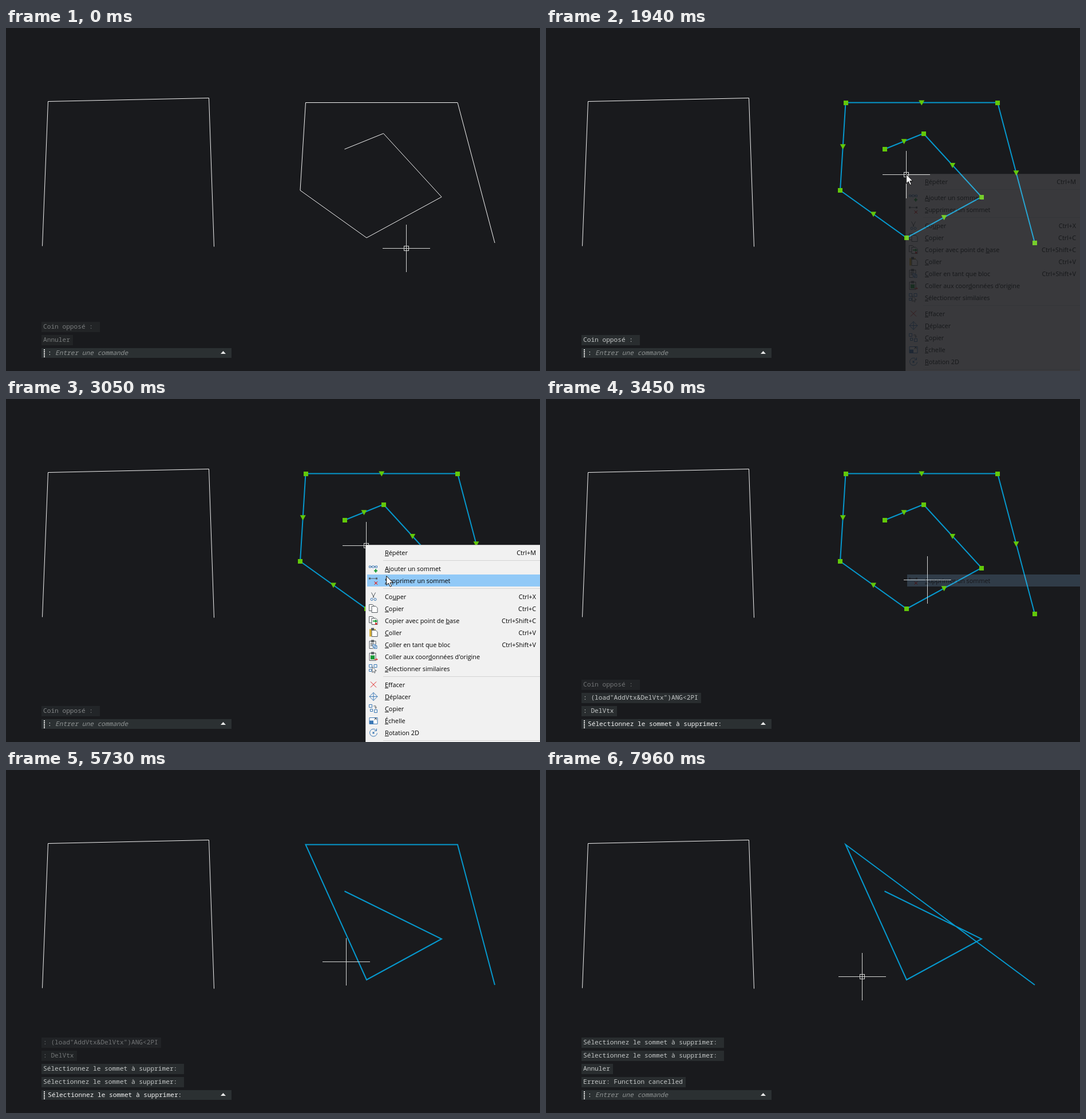
Animation, 933 px wide and 600 px high, one loop 7990 ms. Source, as an HTML page with a canvas:

```html
<!DOCTYPE html>
<html lang="fr">
<head>
<meta charset="utf-8">
<style>
  html, body { margin: 0; width: 100%; height: 100%; overflow: hidden; background: #191a1d; }
  canvas { display: block; }
</style>
</head>
<body>
<canvas id="stage" width="933" height="600"></canvas>
<script>
const LOOP = 7990, BG = '#191a1d';
const MONO = '11.17px "Noto Sans Mono", "DejaVu Sans Mono", monospace';
const SANS = '10.85px "Open Sans", "Noto Sans", sans-serif';
const ctx = document.getElementById('stage').getContext('2d');
const menuLayer = document.createElement('canvas');
menuLayer.width = 933;
menuLayer.height = 600;
const menu = menuLayer.getContext('2d');

const frame = [[63.5, 381.5], [73.5, 128.5], [354.5, 122.5], [363.5, 382.5]];
const shape = [[591.5, 212], [659.5, 184.5], [761, 295.5], [630, 367],
               [514, 284], [523.5, 130.5], [789, 130.5], [854, 376]];
const removals = [[4130, 1], [5310, 4], [6610, 6]]; // time, vertex index

const SELECT = 'Sélectionnez le sommet à supprimer:';
// time shown, time the fade begins, text
const log = [
  [-999, -250, 'Coin opposé : '],
  [-998, -250, 'Annuler'],
  [840, 3050, 'Coin opposé : '],
  [3280, 5320, ': (load"AddVtx&DelVtx")ANG<2PI'],
  [3290, 5350, ': DelVtx'],
  [4130, 6590, SELECT + ' '],
  [5310, 9000, SELECT + ' '],
  [6610, 9000, SELECT + ' '],
  [7100, 9000, 'Annuler'],
  [7110, 9000, 'Erreur: Function cancelled'],
];
const fade = [[0, .6], [400, .5], [1500, .16], [1600, .08], [1900, 0]];

// time, x, y
const crossPath = [
  [0, 699, 385], [420, 699, 385], [900, 600, 290], [1050, 600, 290],
  [1450, 629, 256], [3249, 629, 256], [3250, 666, 316], [3450, 666, 316],
  [3920, 660, 207], [4110, 660, 207], [4640, 618, 301], [4900, 567, 308],
  [5050, 562, 311], [5530, 562, 311], [5750, 600, 332], [6100, 754, 200],
  [6320, 733, 131], [6350, 733, 128], [7060, 733, 128], [7850, 625, 347],
  [7960, 552, 361], [LOOP, 552, 361],
];
const arrowPath = [
  [1900, 629, 256], [2300, 629, 256], [2570, 662, 316], [2690, 664, 309],
  [3040, 664, 309], [3100, 666, 316], [3300, 666, 316],
];

// Icons: colour letter then path in a 16 px box; a capital letter fills
const inks = { k: '#555b60', b: '#3b78b5', r: '#e02020', g: '#159a35', y: '#d9b23c', w: '#ffffff' };
const page = 'WM5 4h7l3 3v8H5z;kM5 4h7l3 3v8H5z';
const clip = 'M1 2h11v13H1z;KM4 0h5v4H4z;';
const items = [
  [269, '&Répéter', 'Ctrl+M', ''],
  [296.5, '&Ajouter un sommet', '', 'kM0 5H14;WM0 3h4v4H0zM6 3h4v4H6zM12 3h3v4h-3z;bM.5 3.5h3v3h-3zM5.5 3.5h4v3h-4zM11.5 3.5h3v3h-3z;GM9 11h2V9h2v2h2v2h-2v2h-2v-2H9z'],
  [317.5, '&Supprimer un sommet', '', 'kM1 4.5H14;KM0 3h3v3H0zM12 3h3v3h-3z;rM9.5 10l5 5M14.5 10l-5 5M10 10l5 5M15 10l-5 5'],
  [345.5, 'Co&uper', 'Ctrl+X', 'kM4.5 1L9 10M11.5 1L7 10;bM3 13a2 2 0 1 0 4 0a2 2 0 1 0-4 0M9 13a2 2 0 1 0 4 0a2 2 0 1 0-4 0'],
  [366.5, '&Copier', 'Ctrl+C', 'WM.5 1h6l3 3v8h-9z;kM.5 1h6l3 3v8h-9z;' + page],
  [387.5, 'Copier avec point de &base', 'Ctrl+Shift+C', 'kM.5 1h6l3 3v8h-9z;' + page + ';GM7 8h4V6l4 3-4 3v-2H7z;RM11 12h3v3h-3z'],
  [408.5, '&Coller', 'Ctrl+V', 'Y' + clip + page],
  [429.5, '&Coller en tant que bloc', 'Ctrl+Shift+V', 'k' + clip + 'kM3 6h6M3 8h5M3 10h4;WM7 8h7v7H7z;bM7 8h5v5H7zM9 10h5v5H9z'],
  [450.5, 'Coller aux coor&données d\'origine', '', 'k' + clip + 'GM3 6h7v7H3z;rM9 13h6M13 11l2 2-2 2'],
  [471.5, '&Sélectionner similaires', '', 'bM.5 1h5v5h-5zM9 1h5v5H9zM.5 9h4v4h-4z;WM6 5v10l2-2 2 3 1-1-1-3h3z;kM6 5v10l2-2 2 3 1-1-1-3h3z'],
  [499.5, '&Effacer', '', 'rM3 3L13 13M13 3L3 13'],
  [520.5, '&Déplacer', '', 'bM8 1v14M1 8h14M8 1L15 8L8 15L1 8z'],
  [541.5, '&Copier', '', 'bM.5 1h5v5h-5zM9.5 10h5v5h-5z;kM8 3.5h4v4M10.5 6l1.5 2 1.5-2;bM2.5 9h4v4h-4z'],
  [562.5, '&Échelle', '', 'WM1 3h14v11H1z;bM1 3h14v11H1z;BM1 8h7v6H1z;kM9 7l4-3M10 4h3v3'],
  [583.5, '&Rotation 2D', '', 'bM13 4A6.5 6.5 0 1 0 14.5 9M13.5 1v4h-4;BM6.5 7h3v3h-3z'],
];

const clamp = v => Math.max(0, Math.min(1, v));

function lerpKeys(keys, t) {
  const i = keys.findIndex(k => k[0] > t);
  if (i < 0) return keys[keys.length - 1][1];
  if (!i) return keys[0][1];
  const [a, b] = [keys[i - 1], keys[i]];
  return a[1] + (b[1] - a[1]) * (t - a[0]) / (b[0] - a[0]);
}

// Smooth curve through the keys that comes to rest on repeated points
function along(keys, t) {
  const last = keys.length - 1;
  let i = keys.findIndex(k => k[0] > t) - 1;
  if (i < 0) i = t < keys[0][0] ? 0 : last - 1;
  const [a, b] = [keys[i], keys[i + 1]];
  const span = b[0] - a[0], u = clamp((t - a[0]) / span);
  const slope = (n, c) => {
    const p = keys[n - 1], k = keys[n], q = keys[n + 1];
    const still = o => !o || (o[1] === k[1] && o[2] === k[2]);
    return still(p) || still(q) ? 0 : (q[c] - p[c]) / (q[0] - p[0]) * span;
  };
  return [1, 2].map(c => {
    const d = b[c] - a[c], m = slope(i, c), n = slope(i + 1, c);
    return a[c] + u * (m + u * (3 * d - 2 * m - n + u * (m + n - 2 * d)));
  });
}

function polyline(points, color, width) {
  ctx.strokeStyle = color;
  ctx.lineWidth = width;
  ctx.beginPath();
  points.forEach(p => ctx.lineTo(...p));
  ctx.stroke();
}

function drawGrips(points) {
  ctx.fillStyle = '#62c80a';
  points.forEach(([x, y], i) => {
    ctx.fillRect(Math.round(x) - 4, Math.round(y) - 4, 8, 8);
    if (!i) return;
    const mx = (x + points[i - 1][0]) / 2, my = (y + points[i - 1][1]) / 2;
    ctx.beginPath();
    ctx.moveTo(mx - 5, my - 4);
    ctx.lineTo(mx + 5, my - 4);
    ctx.lineTo(mx, my + 5);
    ctx.fill();
  });
}

function drawCross([cx, cy], box) {
  const x = Math.round(cx), y = Math.round(cy);
  ctx.fillStyle = '#d6d7d5';
  ctx.fillRect(x - 41, y, 83, 1);
  ctx.fillRect(x, y - 41, 1, 83);
  ctx.strokeStyle = '#d6d7d5';
  ctx.lineWidth = 1;
  if (box) ctx.strokeRect(x - 3.5, y - 3.5, 8, 8);
}

function drawWindow(x, y) {
  const [w, h] = [699 - x, 385 - y];
  ctx.fillStyle = 'rgba(40, 120, 50, .3)';
  ctx.fillRect(x, y, w, h);
  ctx.strokeStyle = '#c8cbc8';
  ctx.lineWidth = 1;
  ctx.setLineDash([4, 3]);
  ctx.strokeRect(Math.round(x) + .5, Math.round(y) + .5, w, h);
  ctx.setLineDash([]);
}

function text(str, x, y, color) {
  ctx.fillStyle = color;
  ctx.fillText(str, x, y);
}

function drawConsole(t, prompt) {
  ctx.font = MONO;
  log.filter(l => l[0] <= t).slice(-4).reverse().forEach(([, start, str], i) => {
    const y = 537 - 23 * i;
    ctx.globalAlpha = t < start ? 1 : lerpKeys(fade, t - start);
    ctx.fillStyle = '#292d2f';
    ctx.fillRect(62, y, Math.round(8 + str.length * 6.7), 18);
    text(str, 65, y + 12, '#c4c7c7');
  });
  ctx.globalAlpha = 1;
  ctx.fillStyle = '#2b3032';
  ctx.fillRect(62, 560, 332, 17);
  ctx.fillStyle = '#e8e8e8';
  for (let y = 562; y < 576; y += 3) ctx.fillRect(66, y, 2, 2);
  ctx.beginPath();
  ctx.moveTo(375, 570);
  ctx.lineTo(379.5, 565);
  ctx.lineTo(384, 570);
  ctx.fill();
  text(prompt || ':', 73, 572, '#f4f4f4');
  if (!prompt) {
    ctx.font = 'italic ' + MONO;
    text('Entrer une commande', 86, 572, '#8f9393');
  }
}

function drawIcon(icon, y) {
  menu.save();
  menu.translate(634, y - 8);
  menu.lineWidth = 1;
  for (const part of icon.split(';').filter(Boolean)) {
    const ink = part[0].toLowerCase(), path = new Path2D(part.slice(1));
    menu.fillStyle = menu.strokeStyle = inks[ink];
    part[0] === ink ? menu.stroke(path) : menu.fill(path);
  }
  menu.restore();
}

function drawMenu(hotY) {
  menu.fillStyle = '#c4c4c4';
  menu.fillRect(628, 255, 305, 345);
  menu.fillStyle = '#f1f1f1';
  menu.fillRect(629, 256, 304, 344);
  menu.fillStyle = '#d4d4d4';
  [282, 331, 485, 597].forEach(y => menu.fillRect(659, y, 274, 1));
  menu.font = SANS;
  for (const [y, label, keys, icon] of items) {
    if (Math.abs(hotY - y) < 10.5) {
      menu.fillStyle = '#91c9f7';
      menu.fillRect(631, Math.round(y - 10.5), 302, 21);
    }
    drawIcon(icon, y);
    const at = label.indexOf('&'), name = label.replace('&', '');
    const left = 662 + menu.measureText(name.slice(0, at)).width;
    menu.fillStyle = '#000';
    menu.fillText(name, 662, y + 4);
    menu.fillRect(left, Math.round(y + 5), menu.measureText(name[at]).width, 1);
    menu.textAlign = 'right';
    menu.fillText(keys, 926, y + 4);
    menu.textAlign = 'left';
  }
}

function drawArrow([x, y]) {
  ctx.save();
  ctx.translate(x, y);
  const path = new Path2D('M.5 0V16L4.2 12.6L7 18.6L9.5 17.5L6.8 11.6H11.8Z');
  ctx.fillStyle = '#fff';
  ctx.strokeStyle = '#111';
  ctx.lineWidth = 1;
  ctx.fill(path);
  ctx.stroke(path);
  ctx.restore();
}

function draw(t) {
  const cross = along(crossPath, t);
  const dragging = t >= 480 && t < 840, picking = t >= 3280 && t < 7100;
  const selected = t >= 840;
  const gone = removals.filter(r => t >= r[0]).map(r => r[1]);
  const points = shape.filter((_, i) => !gone.includes(i));

  ctx.fillStyle = BG;
  ctx.fillRect(0, 0, 933, 600);
  polyline(frame, '#f4f4f4', 1);
  polyline(points, selected ? '#0698cd' : '#f4f4f4', selected ? 2 : 1);
  if (selected && !gone.length) drawGrips(points);
  if (dragging) drawWindow(...cross);
  drawCross(cross, !dragging && (t < 3250 || t >= 7100));
  drawConsole(t, picking ? SELECT : dragging ? 'Coin opposé :' : '');

  if (t >= 1940 && t < 3250) {
    const arrow = along(arrowPath, t);
    drawMenu(t < 2300 ? 0 : arrow[1]);
    ctx.globalAlpha = clamp(.14 + .86 * (t - 1940) / 150);
    ctx.drawImage(menuLayer, 0, 0);
    ctx.globalAlpha = 1;
    drawArrow(arrow);
  } else if (t >= 3250 && t < 3500) {
    // the chosen row lingers after the menu closes
    drawMenu(316);
    ctx.globalAlpha = 1 - (t - 3250) / 250;
    ctx.drawImage(menuLayer, 631, 307, 302, 21, 631, 307, 302, 21);
    ctx.globalAlpha = 1;
  }
}

const begin = performance.now();
function tick() {
  draw((performance.now() - begin) % LOOP);
  requestAnimationFrame(tick);
}
tick();
</script>
</body>
</html>
```
